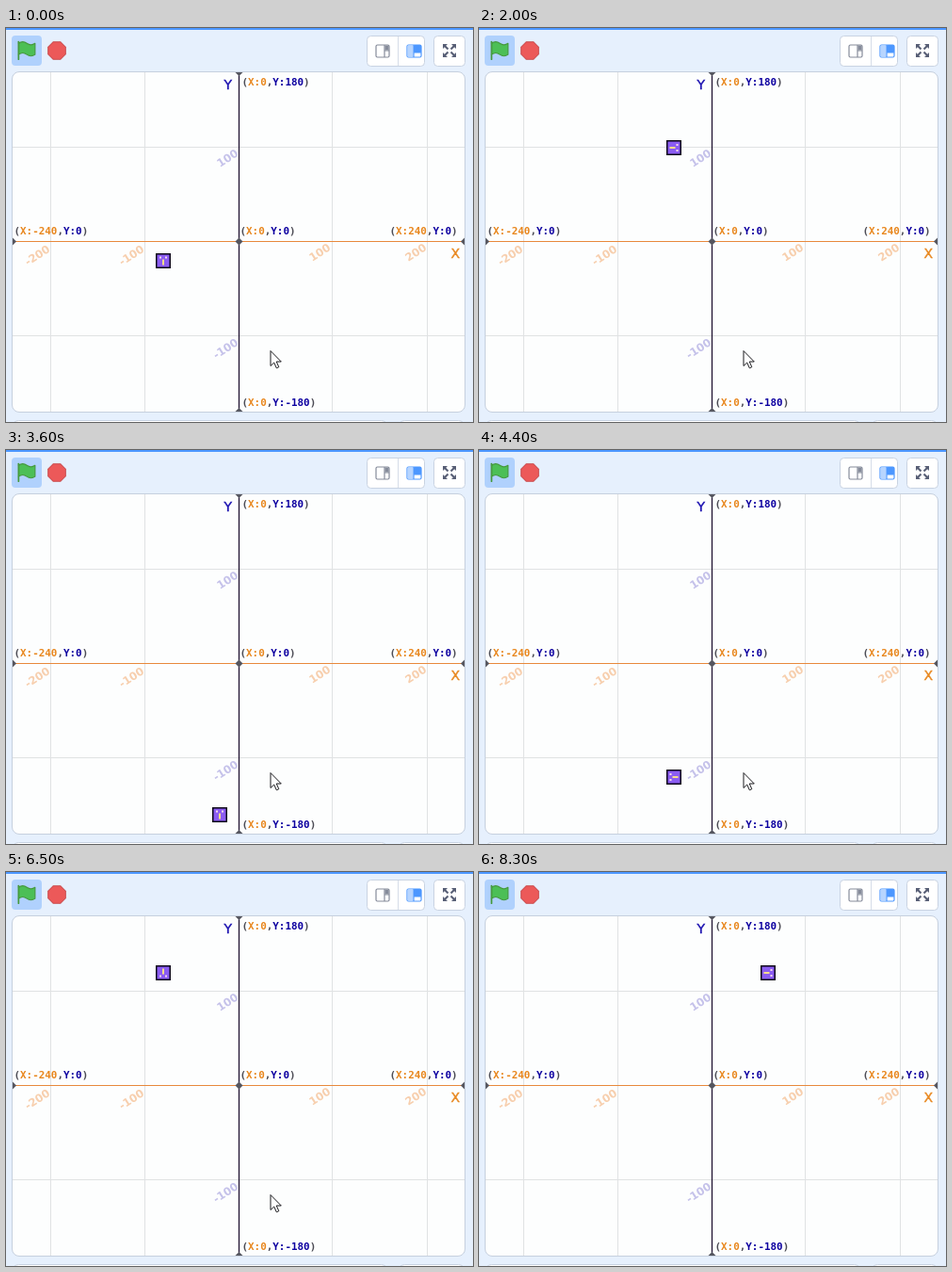
Recreate the animation shown at these times as an HTML page. Size 496 by 418 pixels, loop 8.5 s.

```html
<!DOCTYPE html>
<html lang="en">
<head>
<meta charset="utf-8">
<title>Grid walk</title>
<style>
  html, body { margin: 0; width: 100%; height: 100%; overflow: hidden; background: #e6f0fd; }
  svg { display: block; width: 496px; height: 418px; }
  .panel { fill: #fff; stroke: #c9d3e2; }
  .grid { stroke: #e0e2e3; }
  .tip { fill: #55565f; }
  .coord { font: bold 10.9px "DejaVu Sans Mono", monospace; fill: #4c4c55; white-space: pre; }
  .coord .x { fill: #e8871e; }
  .coord .y { fill: #0d00a0; }
  .axis { font: 14px "DejaVu Sans", sans-serif; stroke-width: .4; }
  .tick { font: bold 11.6px "DejaVu Sans", sans-serif; text-anchor: middle; }
  .ox { fill: #f7cfae; }
  .oy { fill: #c5c2ea; }
  #pointer { animation: pointer 8.5s step-end infinite; }
  @keyframes pointer { 0% { opacity: 1; } 82.35% { opacity: 0; } 100% { opacity: 0; } }
</style>
</head>
<body>
<svg viewBox="0 0 496 418">
  <defs>
    <clipPath id="area"><rect x="7" y="47" width="480" height="360" rx="7"/></clipPath>
  </defs>
  <rect width="496" height="418" fill="#e6f0fd"/>
  <rect width="496" height="2" fill="#4c97ff"/>

  <!-- toolbar -->
  <rect x="6" y="8" width="32" height="32" rx="4" fill="#b0d1fd"/>
  <g transform="translate(12.5 14) scale(1.14)" fill="#4cbf56" stroke="#45993d" stroke-linecap="round" stroke-linejoin="round">
    <path d="M.75 2A6.44 6.44 0 0 1 8.44 2A6.44 6.44 0 0 0 16.1 2V12.4A6.44 6.44 0 0 1 8.44 12.4A6.44 6.44 0 0 0 .75 12.4"/>
    <path d="M.75 16.8V.5" stroke-width="1.5"/>
  </g>
  <path transform="translate(44 14) scale(1.43)" d="M4.3 .5H9.7L13.5 4.3V9.7L9.7 13.5H4.3L.5 9.7V4.3Z" fill="#ec5959" stroke="#c94d4f" stroke-width=".7"/>

  <rect class="panel" x="383.5" y="8.500" width="61" height="32" rx="4"/>
  <path d="M416.500 9V40" stroke="#d5dce8"/>
  <g fill="#fff" stroke="#858b9a" stroke-width="1.2">
    <rect x="393" y="18" width="14" height="13" rx="1.5"/>
    <path d="M402 18V31M402 24H407"/>
    <rect x="402.500" y="18.500" width="4" height="5" fill="#858b9a" stroke="none"/>
  </g>
  <g fill="#fff" stroke="#4c97ff" stroke-width="1.2">
    <rect x="426" y="18" width="15" height="13" rx="1.5"/>
    <rect x="426.500" y="18.500" width="6" height="12" fill="#b7d5ff" stroke="none"/>
    <path d="M433 18V31M433 26H441"/>
    <rect x="433" y="18" width="8" height="8" rx="1" fill="#4c97ff" stroke="none"/>
  </g>
  <rect class="panel" x="454.500" y="8.500" width="33" height="32" rx="4"/>
  <g fill="#575e75" stroke="#575e75" stroke-width="2">
    <path d="M466 19L469.500 22.500M476 19L472.500 22.500M466 29L469.500 25.500M476 29L472.500 25.500"/>
    <path d="M464 17H469L464 22ZM478 17H473L478 22ZM464 31H469L464 26ZM478 31H473L478 26Z" stroke="none"/>
  </g>

  <!-- stage -->
  <rect x="6.500" y="46.500" width="481" height="361" rx="7.500" fill="#fdfefe" stroke="#c6d0de"/>
  <g clip-path="url(#area)">
    <path class="grid" d="M47.500 47V407M147.500 47V407M346.500 47V407M447.500 47V407M7 126.500H487M7 326.500H487"/>
    <g class="tick">
      <g class="ox" id="ticksX"></g>
      <g class="oy" id="ticksY"></g>
    </g>
    <path d="M7 226.500H487" stroke="#e8893c" stroke-width="1.2"/>
    <path d="M247.500 47V407" stroke="#150828" stroke-width="1.2"/>
    <path class="tip" d="M247.500 222.500L251.500 226.500L247.500 230.500L243.500 226.500ZM7 222.500L11 226.500L7 230.500ZM487 222.500L483 226.500L487 230.500ZM243.500 47H251.500L247.500 51ZM243.500 407H251.500L247.500 403Z"/>
    <g class="coord" id="coords"></g>
    <text class="axis" x="231.500" y="65" fill="#1a10b0" stroke="#1a10b0">Y</text>
    <text class="axis" x="472.500" y="244" fill="#e8871e" stroke="#e8871e">X</text>
    <g id="walker">
      <rect x="-7.250" y="-7.250" width="14.500" height="14.500" fill="#8b5cf2" stroke="#0c0618" stroke-width="1.5"/>
      <path d="M-4 -4.500h2v2h-2zM2 -4.500h2v2h-2z" fill="#f6d9e8"/>
      <path d="M-1 -1.500h2v6h-2z" fill="#f7dc8c"/>
    </g>
  </g>
  <path id="pointer" transform="translate(281 342)" d="M0 .5V16.500L3.700 13L6.300 18.800L8.800 17.700L6.200 12H11.300Z" fill="#fff" stroke="#18181c"/>

  <!-- panels below -->
  <rect class="panel" x="6.500" y="416.500" width="399" height="20" rx="7"/>
  <rect class="panel" x="416.500" y="416.500" width="71" height="20" rx="7"/>
</svg>
<script>
  const byId = id => document.getElementById(id);

  const coord = (left, base, x, y) =>
    `<text x="${left}" y="${base}">(<tspan class="x">X:${x}</tspan>,<tspan class="y">Y:${y}</tspan>)</text>`;
  byId('coords').innerHTML =
    coord(250.5, 61, 0, 180) + coord(8.5, 219, -240, 0) + coord(248.5, 219, 0, 0) +
    coord(407.5, 219, 240, 0) + coord(250.5, 401, 0, -180);

  const tick = (x, y, label) =>
    `<text transform="translate(${x} ${y}) rotate(-33)" y="4.2">${label}</text>`;
  byId('ticksX').innerHTML =
    tick(33, 241, -200) + tick(133, 241, -100) + tick(333, 238, 100) + tick(435, 238, 200);
  byId('ticksY').innerHTML = tick(235, 138, 100) + tick(233, 340, -100);

  // Walk in 20 px moves; the top and bottom edges are joined.
  const LOOP = 8500, FRAME = 100, FIRST = 128.2, BEAT = 263.6;
  const DIRS = { U: [0, -20, 0], R: [20, 0, 90], D: [0, 20, 180], L: [-20, 0, 270] };
  const TOP = 47, BOTTOM = 407;
  const route = [['U', 6], ['R', 3], ['U', 7], ['L', 3], ['D', 6], ['R', 7]];

  const poses = [[167, 247, 0]];
  for (const [dir, count] of route) {
    const [dx, dy, angle] = DIRS[dir];
    for (let i = 0; i < count; i++) {
      let [x, y] = poses[poses.length - 1];
      x += dx;
      y += dy;
      if (y <= TOP) y = BOTTOM;
      else if (y >= BOTTOM) y = TOP;
      poses.push([x, y, angle]);
    }
  }

  const walker = byId('walker');
  function draw() {
    const t = Math.floor(performance.now() % LOOP / FRAME) * FRAME;
    const step = Math.floor((t - FIRST) / BEAT) + 1;
    const [x, y, angle] = poses[Math.max(0, Math.min(step, poses.length - 1))];
    walker.setAttribute('transform', `translate(${x} ${y}) rotate(${angle})`);
    requestAnimationFrame(draw);
  }
  draw();
</script>
</body>
</html>
```
